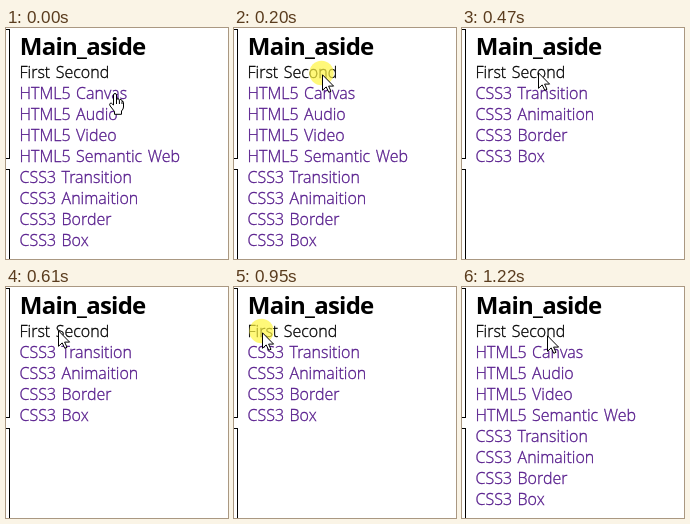
Recreate the animation shown at these times as an HTML page. Size 222x231 px, loop 1.29 s.

```html
<!DOCTYPE html>
<html lang="en">
<head>
<meta charset="utf-8">
<title>Main_aside</title>
<style>
html, body { margin: 0; width: 100%; height: 100%; overflow: hidden; background: #fff; }
svg { display: block; width: 222px; height: 231px; }
text {
  font: 300 16px "Open Sans", "Noto Sans", sans-serif;
  word-spacing: 1.4px;
  fill: var(--ink);
  stroke: var(--ink);
  stroke-width: .3px;
  --ink: #000;
}
.title { font-weight: 700; font-size: 24px; letter-spacing: -.75px; stroke: none; }
.link { --ink: #551a8b; }
.box { fill: none; stroke: #000; shape-rendering: crispEdges; }
.cursor { fill: #fff; stroke: #000; stroke-linejoin: round; }
</style>
</head>
<body>
<svg viewBox="0 0 222 231">
  <path class="box" d="M0 1.5H3.5V130.5H0M0 141.5H3.5V231"/>
  <text class="title" x="13.8" y="27">Main_aside</text>
  <text x="13.5" y="50">First Second</text>
  <g id="html"></g>
  <g id="css"></g>
  <circle id="glow" r="12.2" fill="#fff540" opacity=".7"/>
  <path id="arrow" class="cursor" d="M.5 .8V16.3L4.2 12.9 6.8 18.3 9 17.3 6.6 12.1H11.6Z"/>
  <g id="hand" class="cursor">
    <path d="M4.5 12V2Q4.5 .5 6 .5T7.5 2V7Q7.7 5.6 9 5.7T10.4 7.5Q10.8 6.2 12 6.5T13 8.3Q14.5 7.8 14.5 9.8V14Q14.5 16 12.5 18V21.3H5.5V18.5L1.2 13Q0 11 1.2 10.3T3.2 11Z"/>
    <path fill="none" d="M7.5 6.5V11M10.4 7.5V11M13 8.5V11"/>
  </g>
</svg>
<script>
const LOOP = 1290;
const STEP = 70;
const LINE = 21;
const FIRST_BASELINE = 71;

const linear = p => p;
const smooth = p => p * p * (3 - 2 * p);

// Each move runs in whole steps; the cursor rests on its end point until the next.
const moves = [
  { start: 0, count: 2, from: [109, 65], to: [88, 46], lift: 0, ease: linear },
  { start: 400, count: 5, from: [88, 46], to: [28, 45], lift: 3, ease: linear },
  { start: 1010, count: 4, from: [28, 45], to: [96, 49], lift: 0, ease: smooth }
];

const el = id => document.getElementById(id);
const glow = el("glow"), html = el("html"), css = el("css");
const arrow = el("arrow"), hand = el("hand");

function fill(group, names) {
  names.forEach((name, i) => {
    const text = document.createElementNS("http://www.w3.org/2000/svg", "text");
    text.setAttribute("class", "link");
    text.setAttribute("x", 13.5);
    text.setAttribute("y", FIRST_BASELINE + i * LINE);
    text.textContent = name;
    group.append(text);
  });
}
fill(html, ["HTML5 Canvas", "HTML5 Audio", "HTML5 Video", "HTML5 Semantic Web"]);
fill(css, ["CSS3 Transition", "CSS3 Animaition", "CSS3 Border", "CSS3 Box"]);

const between = (time, from, to) => time >= from && time < to;

function cursorAt(time) {
  const { start, count, from, to, lift, ease } = moves.findLast(m => m.start <= time);
  const p = Math.min(Math.floor((time - start) / STEP) / count, 1);
  const mix = i => from[i] + (to[i] - from[i]) * ease(p);
  return [Math.round(mix(0)), Math.round(mix(1) - lift * Math.sin(Math.PI * p))];
}

function place(node, x, y, shown) {
  node.setAttribute("transform", `translate(${x} ${y})`);
  node.style.display = shown ? "" : "none";
}

function draw(now) {
  const time = now % LOOP;
  const [x, y] = cursorAt(time);
  const open = !between(time, 340, 1080);
  const click = between(time, 200, 340) || between(time, 950, 1080);
  const overLink = y > 60;
  place(html, 0, 0, open);
  place(css, 0, open ? 4 * LINE : 0, true);
  place(glow, x - .5, y - 1, click);
  place(arrow, x, y, !overLink);
  place(hand, x - 6, y, overLink);
}

const start = performance.now();
function tick() {
  draw(performance.now() - start);
  requestAnimationFrame(tick);
}
tick();
</script>
</body>
</html>
```
